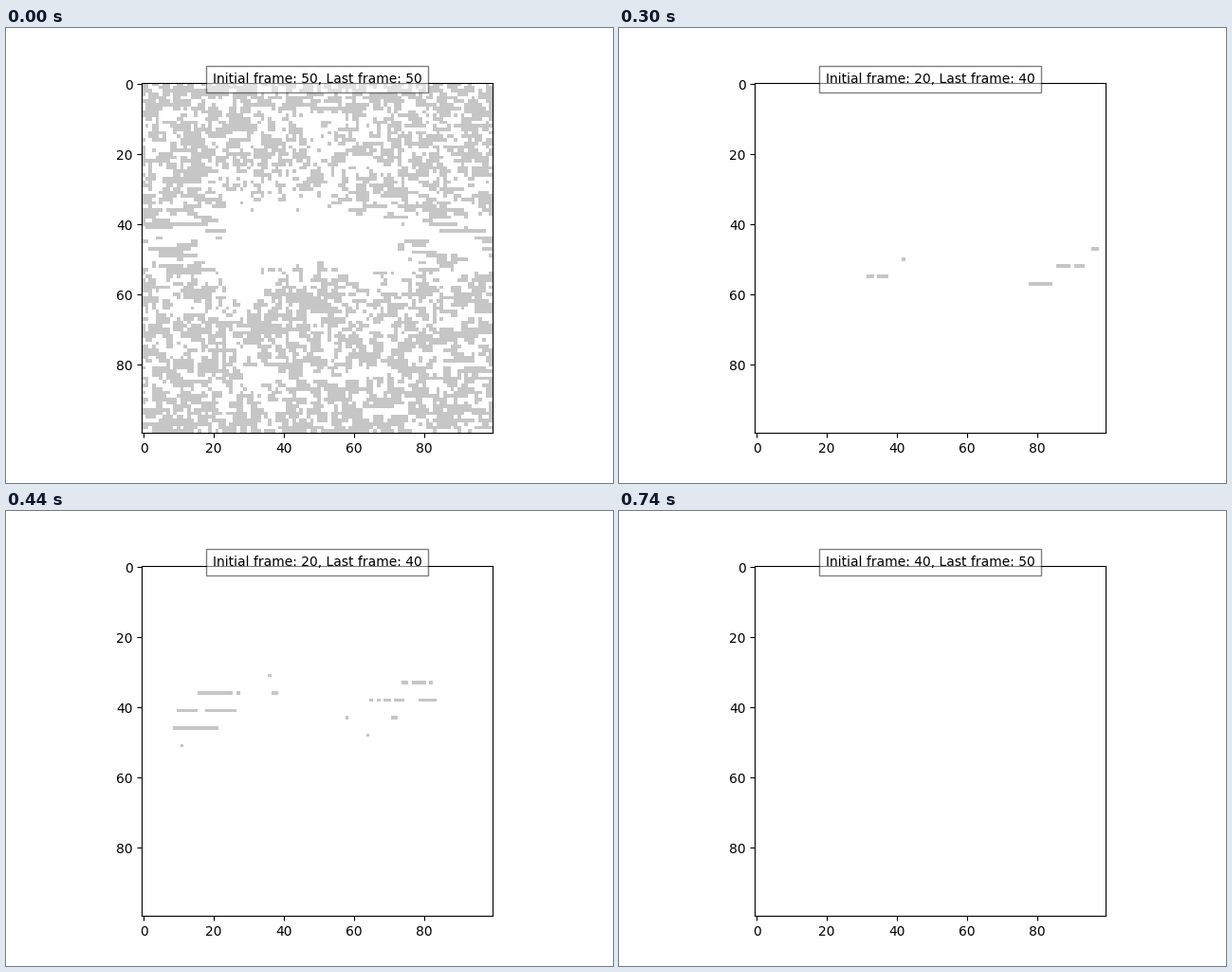
Recreate the animation shown at these times as a matplotlib script. Size 640 by 480 pixels, loop 840 ms.

```python
import numpy as np
import matplotlib.pyplot as plt
from matplotlib.animation import FuncAnimation
from matplotlib.colors import ListedColormap

SIZE = 100
STEP = 20  # ms
HOLD = 100  # ms
ROW_GAP = 5
FILL = "#c6c6c6"


def hill(row, col, height, width):
    y, x = np.mgrid[:SIZE, :SIZE]
    return np.exp(-((y - row) / height) ** 2 - ((x - col) / width) ** 2)


def density():
    """Even cover with a bare belt, a few bare spots and a few thick ones."""
    cover = 0.56 - 0.40 * hill(45, 50, 10, 150)
    cover -= 0.45 * hill(42, 43, 13, 20)
    cover -= 0.45 * hill(12, 49, 8, 6)
    cover -= 0.45 * hill(57, 28, 9, 6)
    cover += 0.35 * hill(61, 48, 8, 9)
    cover += 0.30 * hill(33, 70, 6, 7)
    cover += 0.15 * hill(41, 12, 7, 8)
    cover += 0.12 * hill(95, 60, 8, 60)
    return cover


def noise():
    """Clumped random cells; inside the belt they stretch into streaks."""
    rng = np.random.default_rng(11)
    level = rng.random((SIZE, SIZE))
    pick = rng.random((SIZE, SIZE))
    belt = hill(44, 50, 9, 1e6)
    along = 0.3 + 0.5 * belt
    down = 0.22 * (1 - belt)
    for r in range(1, SIZE):
        for c in range(1, SIZE):
            if pick[r, c] < along[r, c]:
                level[r, c] = level[r, c - 1]
            elif pick[r, c] < along[r, c] + down[r, c]:
                level[r, c] = level[r - 1, c]
    return (level < density()).astype(float)


def band(top, *rows):
    """Dashes on evenly spaced rows; each row lists where cells switch."""
    grid = np.zeros((SIZE, SIZE))
    for k, edges in enumerate(rows):
        for edge in edges:
            line = grid[top + k * ROW_GAP, edge:]
            line[:] = 1 - line
    return grid


empty = np.zeros((SIZE, SIZE))
spread = (
    band(31, (36, 37), (16, 26, 27, 28, 37, 39), (10, 16, 18, 27),
         (9, 22), (11, 12))
    + band(33, (74, 76, 77, 81, 82, 83),
           (65, 66, 67, 68, 69, 71, 72, 75, 79, 84), (58, 59, 71, 73), (64, 65))
)
middle = band(47, (27, 28), (20, 23)) + band(44, (78, 85), (73, 85), (66, 68))
late = (
    band(50, (42, 43), (32, 34, 35, 38))
    + band(47, (96, 98), (86, 90, 91, 94), (78, 85))
)

# Each scene: grid, first and last number in the label, duration in ms.
burst = [(grid, 20, 40, HOLD) for grid in (spread, middle, late)]
scenes = [
    (noise(), 50, 50, HOLD), *burst,
    (empty, 0, 20, 40), *burst,
    (empty, 40, 50, HOLD),
]
timeline = [s for s in scenes for _ in range(s[-1] // STEP)]

fig, ax = plt.subplots(figsize=(6.4, 4.8), dpi=100)
image = ax.imshow(empty, cmap=ListedColormap(["white", FILL]),
                  vmin=0, vmax=1, interpolation="nearest")
label = ax.text(0.5, 1.0, "", transform=ax.transAxes, ha="center",
                bbox={"facecolor": "w", "alpha": 0.5, "pad": 5})


def draw(i):
    grid, first, last, _ = timeline[i]
    image.set_data(grid)
    label.set_text(f"Initial frame: {first}, Last frame: {last}")
    return image, label


anim = FuncAnimation(fig, draw, frames=len(timeline), interval=STEP,
                     repeat=True, repeat_delay=0)
plt.show()
```
